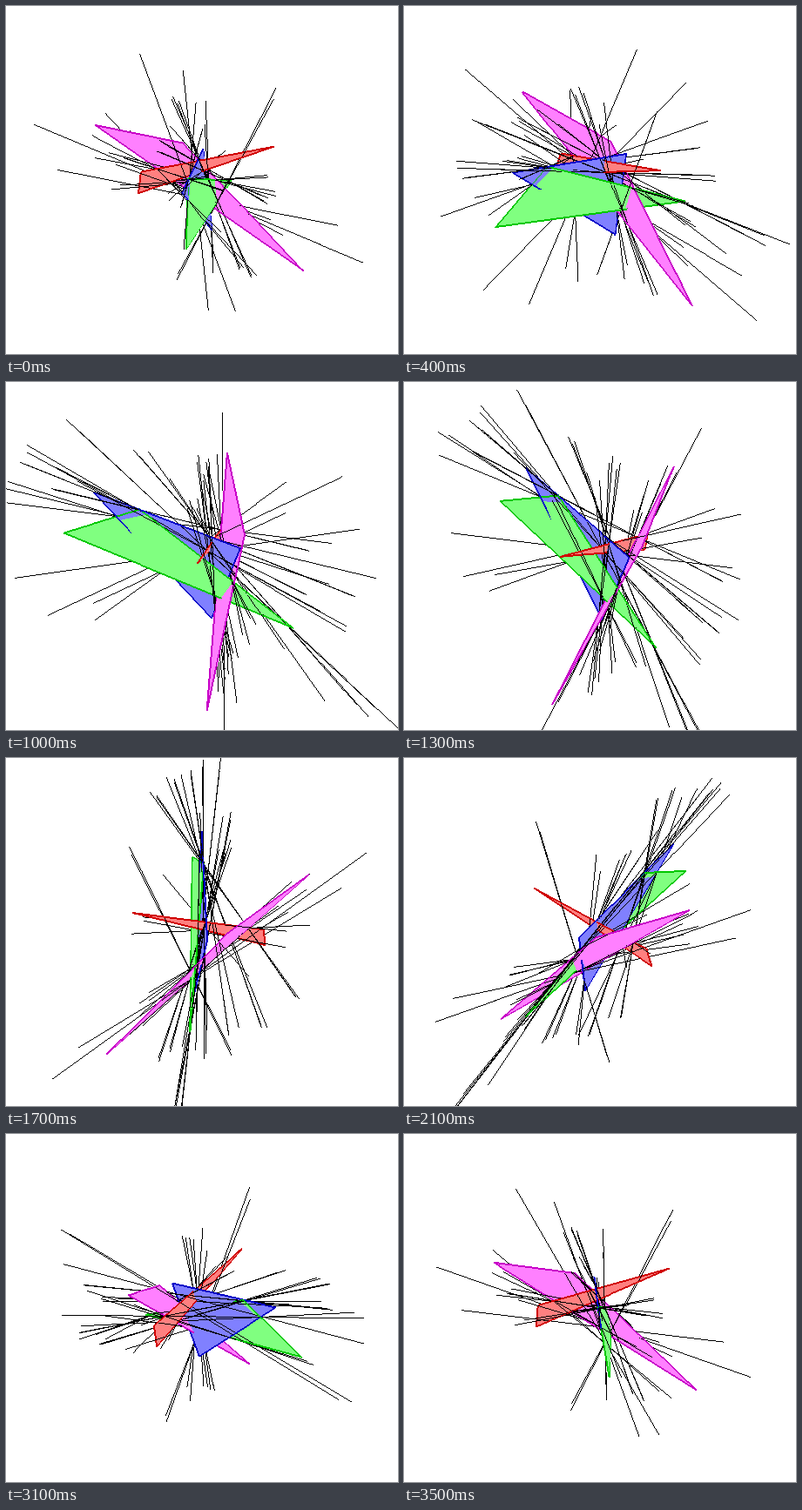
An HTML page with a canvas that plays this animation: 450x400 px, repeating every 3600 ms.

```html
<!DOCTYPE html>
<html lang="en">
<head>
<meta charset="utf-8">
<title>Common tangents of four triangles</title>
<style>
  html, body { margin: 0; width: 100%; height: 100%; overflow: hidden; background: #fff; }
  canvas { display: block; width: 450px; height: 400px; }
</style>
</head>
<body>
<canvas id="stage" width="450" height="400"></canvas>
<script>
const W = 450, H = 400, CX = 224.75, TILT = 0.5;
const STEP = 100, STEPS = 36, REACH = 1.05;

const ctx = document.getElementById('stage').getContext('2d');
const image = ctx.createImageData(W, H);
const pixels = new Uint32Array(image.data.buffer);
const depth = new Float32Array(W * H);

const rgb = (r, g, b) => (255 << 24 | b << 16 | g << 8 | r) >>> 0;
const BLACK = rgb(0, 0, 0), WHITE = rgb(255, 255, 255);

// Vertices: two ground coordinates, then the height on screen.
const triangles = [
  { fill: rgb(255, 128, 255), edge: rgb(200, 0, 200),
    v: [[-122.7, 8, 141], [-21, 46.3, 181], [116.2, 26.5, 317.3]] },
  { fill: rgb(255, 128, 128), edge: rgb(208, 0, 0),
    v: [[82.2, 9.3, 166.3], [-69.9, 13, 197], [-72.7, 6.5, 218.2]] },
  { fill: rgb(128, 128, 255), edge: rgb(0, 0, 200),
    v: [[-22.6, -129.4, 149.2], [1.5, 45, 186.7], [11.5, 13.5, 264]] },
  { fill: rgb(128, 255, 128), edge: rgb(0, 200, 0),
    v: [[-18, -164.7, 196.7], [-15.7, -75.4, 160.7], [33.4, 111.9, 256.5]] }
];

const sub = (p, q) => [p[0] - q[0], p[1] - q[1], p[2] - q[2]];
const along = (p, d, t) => [p[0] + d[0] * t, p[1] + d[1] * t, p[2] + d[2] * t];
const dot = (p, q) => p[0] * q[0] + p[1] * q[1] + p[2] * q[2];
const cross = (p, q) => [
  p[1] * q[2] - p[2] * q[1],
  p[2] * q[0] - p[0] * q[2],
  p[0] * q[1] - p[1] * q[0]
];

const edgesOf = v => v.map((p, i) => ({ p, d: sub(v[(i + 1) % 3], p) }));

function quadraticRoots(a, b, c) {
  if (Math.abs(a) < 1e-9 * (Math.abs(b) + Math.abs(c))) return [-c / b];
  const disc = b * b - 4 * a * c;
  if (disc < 0) return [];
  const r = Math.sqrt(disc);
  return [(-b - r) / (2 * a), (-b + r) / (2 * a)];
}

// Lines that meet all four edges, as segments stretched past the outer contacts.
function transversals(first, others) {
  const found = [];
  const normals = u => {
    const p = along(first.p, first.d, u);
    return others.map(e => cross(sub(e.p, p), e.d));
  };
  const value = u => {
    const n = normals(u);
    return dot(n[0], cross(n[1], n[2]));
  };
  const f0 = value(0), fh = value(0.5), f1 = value(1);
  const a = 2 * (f0 + f1 - 2 * fh), b = f1 - f0 - a;

  for (const u of quadraticRoots(a, b, f0)) {
    if (!(u >= 0 && u <= 1)) continue;
    const p = along(first.p, first.d, u), n = normals(u);
    let dir = cross(n[0], n[1]);
    const size = Math.sqrt(dot(dir, dir));
    if (size < 1e-9) continue;
    dir = dir.map(x => x / size);
    let lo = 0, hi = 0, ok = true;
    for (const e of others) {
      const w = cross(e.d, dir);
      const v = -dot(cross(sub(e.p, p), dir), w) / dot(w, w);
      if (!(v >= 0 && v <= 1)) { ok = false; break; }
      const t = dot(sub(along(e.p, e.d, v), p), dir);
      lo = Math.min(lo, t);
      hi = Math.max(hi, t);
    }
    if (!ok) continue;
    const extra = (hi - lo) * REACH;
    found.push([along(p, dir, lo - extra), along(p, dir, hi + extra)]);
  }
  return found;
}

const tangents = [];
const [E0, E1, E2, E3] = triangles.map(t => edgesOf(t.v));
for (const a of E0) for (const b of E1) for (const c of E2) for (const d of E3)
  tangents.push(...transversals(a, [b, c, d]));

function projector(angle) {
  const c = Math.cos(angle), s = Math.sin(angle);
  return ([a, b, h]) => {
    const near = a * s - b * c;
    return [CX + a * c + b * s, h + TILT * near, near];
  };
}

function plot(x, y, z, color) {
  if (x < 0 || y < 0 || x >= W || y >= H) return;
  const i = y * W + x;
  if (z < depth[i]) return;
  depth[i] = z;
  pixels[i] = color;
}

function drawLine(p, q, color, width, bias) {
  const dx = q[0] - p[0], dy = q[1] - p[1], dz = q[2] - p[2];
  const flat = Math.abs(dx) >= Math.abs(dy);
  const n = Math.max(1, Math.ceil(Math.max(Math.abs(dx), Math.abs(dy))));
  for (let i = 0; i <= n; i++) {
    const t = i / n;
    const x = Math.round(p[0] + dx * t), y = Math.round(p[1] + dy * t);
    const z = p[2] + dz * t + bias;
    for (let k = 0; k < width; k++)
      plot(flat ? x : x - k, flat ? y - k : y, z, color);
  }
}

function fillTriangle([p, q, r], color) {
  const area = (q[0] - p[0]) * (r[1] - p[1]) - (q[1] - p[1]) * (r[0] - p[0]);
  if (Math.abs(area) < 1e-6) return;
  const xs = [p[0], q[0], r[0]], ys = [p[1], q[1], r[1]];
  const x1 = Math.max(...xs), y1 = Math.max(...ys);
  for (let y = Math.ceil(Math.min(...ys)); y <= y1; y++) {
    for (let x = Math.ceil(Math.min(...xs)); x <= x1; x++) {
      const u = ((x - p[0]) * (r[1] - p[1]) - (y - p[1]) * (r[0] - p[0])) / area;
      const v = ((q[0] - p[0]) * (y - p[1]) - (q[1] - p[1]) * (x - p[0])) / area;
      if (u < 0 || v < 0 || u + v > 1) continue;
      plot(x, y, p[2] + u * (q[2] - p[2]) + v * (r[2] - p[2]), color);
    }
  }
}

function render(step) {
  const project = projector(step * 2 * Math.PI / STEPS);
  pixels.fill(WHITE);
  depth.fill(-1e6);
  const shapes = triangles.map(t => ({ ...t, v: t.v.map(project) }));
  for (const t of shapes) fillTriangle(t.v, t.fill);
  for (const t of shapes)
    t.v.forEach((p, i) => drawLine(p, t.v[(i + 1) % 3], t.edge, 2, 1));
  for (const [p, q] of tangents) drawLine(project(p), project(q), BLACK, 1, 0);
  ctx.putImageData(image, 0, 0);
}

const start = performance.now();
let shown = -1;
function tick() {
  const step = Math.floor((performance.now() - start) / STEP) % STEPS;
  if (step !== shown) render(shown = step);
  requestAnimationFrame(tick);
}
tick();
</script>
</body>
</html>
```
